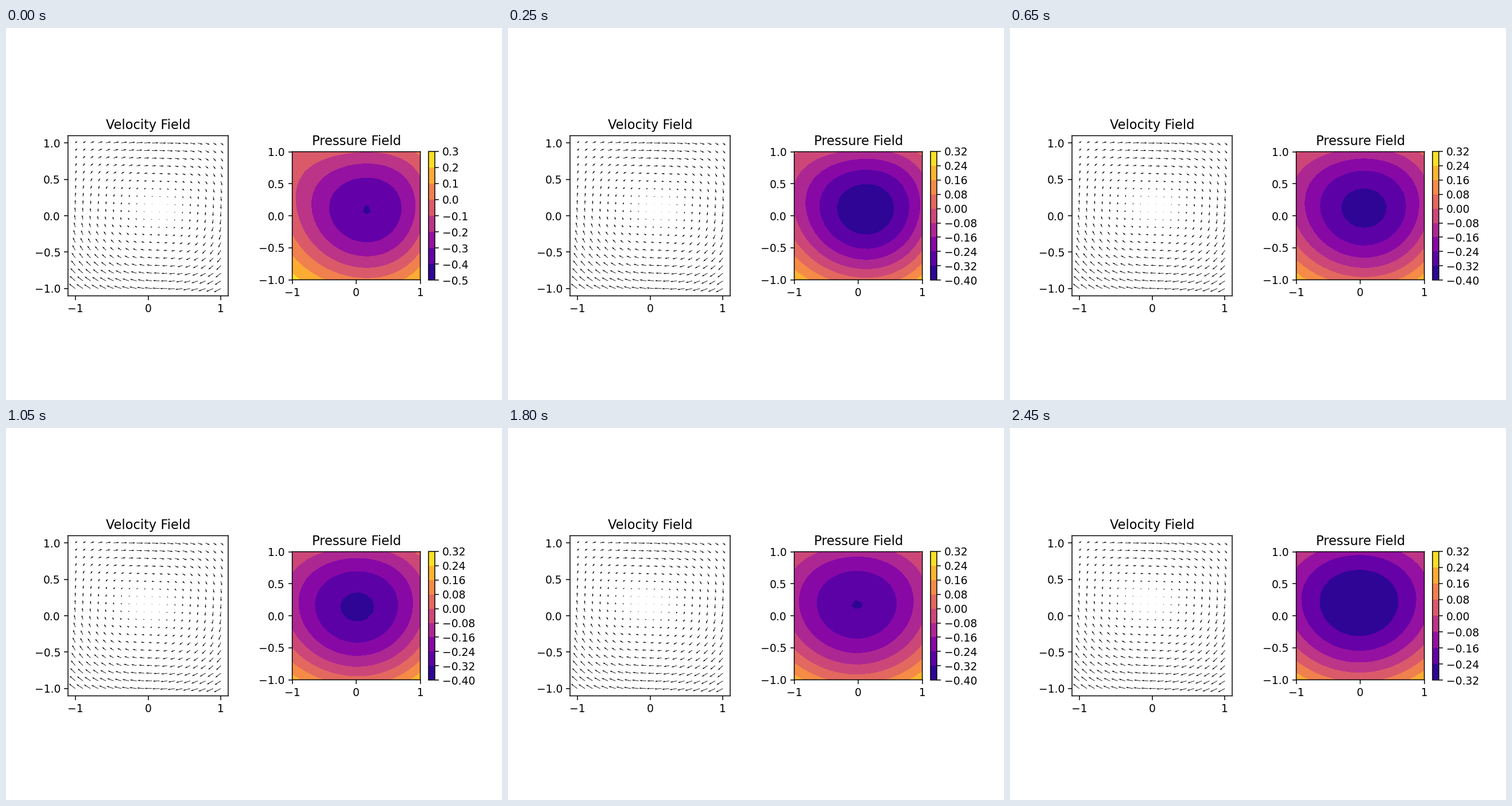
Recreate the animation shown at these times as a matplotlib script. Size 864 by 648 pixels, loop 2.5 s.

```python
import numpy as np
import matplotlib.pyplot as plt
from matplotlib.animation import FuncAnimation

W, H, DPI = 864, 648, 135
FRAMES, STEP = 50, 50
MID = 320.95  # height of the shared centre line

fig = plt.figure(figsize=(W / DPI, H / DPI), dpi=DPI, facecolor="white")


def centred_axes(left, width, height):
    return fig.add_axes([left / W, (MID - height / 2) / H, width / W, height / H])


vel_ax = centred_axes(108, 279, 279)
pres_ax = centred_axes(498.6, 223.1, 223.1)
bar_ax = centred_axes(735.75, 11.23, 224.5)

for ax, lim, title in ((vel_ax, 1.1, "Velocity Field"), (pres_ax, 1, "Pressure Field")):
    ax.set(xlim=(-lim, lim), ylim=(-lim, lim), title=title,
           xticks=[-1, 0, 1], yticks=[-1, -0.5, 0, 0.5, 1])
    for spine in ax.spines.values():
        spine.set_snap(False)

grid = np.linspace(-1, 1, 20)
X, Y = np.meshgrid(grid, grid)


def centre(t):
    """The vortex core swings left while it drifts upwards."""
    return 0.165 * np.exp(-0.9 * t) * np.cos(1.25 * t), 0.09 + 0.045 * t


def pressure(t):
    """A bowl around the core that flattens as the flow settles."""
    cx, cy = centre(t)
    x, y = X - cx, Y - cy
    e = np.exp(-t / 0.8)
    along_x = (0.2 + 0.125 * e) * x**2 + 0.045 * e * x**3 - (0.015 + 0.005 * e) * x**4
    along_y = (0.28 + 0.125 * e) * y**2 - (0.016 + 0.03 * e) * y**4
    corners = x**2 * ((0.03 + 0.04 * e) * y + (0.045 + 0.09 * e) * y**2)
    return along_x + along_y - corners - 0.313 - 0.09 * e


def velocity(t):
    """Clockwise swirl, strongest along the bottom edge."""
    cx, cy = centre(t)
    u = (Y * (11.5 - 4 * X**2 + 0.5 * X) - 11.5 * cy * (1 - Y**2)
         - Y**2 * (0.5 + 3 * X**2))
    v = (-X * (8.25 - 1.75 * Y - 3 * Y**2) + 8.25 * cx * (1 - X**2)
         + X**2 * (0.7 * Y**2 - 0.25) - 0.75 * Y - 0.2 * Y**2)
    return u, v


def levels_at(t):
    if t < 0.05:
        return np.arange(-5, 4) * 0.1
    return np.arange(-5 if t < 1.9 else -4, 5) * 0.08


drawn = []


def draw(frame):
    t = frame * STEP / 1000
    levels = levels_at(t)
    p = np.clip(pressure(t), levels[0] + 1e-4, levels[-1] - 1e-4)
    for artist in drawn:
        artist.remove()
    arrows = vel_ax.quiver(X, Y, *velocity(t))
    bands = pres_ax.contourf(X, Y, p, levels=levels, cmap="plasma")
    drawn[:] = [arrows, bands]
    bar_ax.cla()
    fig.colorbar(bands, cax=bar_ax)
    return drawn


anim = FuncAnimation(fig, draw, frames=FRAMES, init_func=lambda: [],
                     interval=STEP, repeat=True, repeat_delay=0)
plt.show()
```
